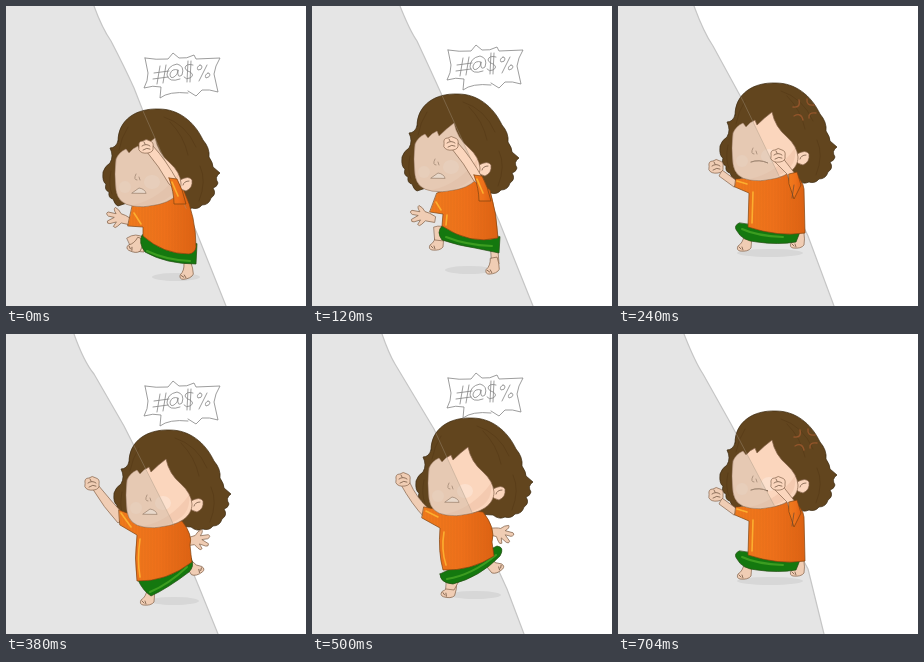
These frames come from a looping animation (300x300 px, 760 ms). An HTML page:

```html
<!DOCTYPE html>
<html lang="en">
<head>
<meta charset="utf-8">
<title>Temper at the glass</title>
<style>
html, body { margin: 0; width: 100%; height: 100%; overflow: hidden; background: #fff; }
svg { display: block; width: 100vw; height: 100vh; }
path { stroke-linejoin: round; stroke-linecap: round; }
.skin { fill: #fbd6bd; stroke: #84644b; stroke-width: .7; }
#body .skin { fill: #f0cdb4; }
.shirt { fill: url(#cloth); stroke: #7d4310; stroke-width: .7; }
.pants { fill: #14780f; stroke: #254d14; stroke-width: .7; }
.hair { fill: #62451e; stroke: #3b2a12; stroke-width: .7; }
.line { fill: none; stroke: #654935; stroke-width: .7; }
.ink { fill: none; stroke: #858585; stroke-width: .8; }
.shine { fill: none; stroke: #ffbd35; stroke-width: 1.6; opacity: .8; }
.grass { fill: none; stroke: #3c9d20; stroke-width: 2; }
</style>
</head>
<body>
<svg viewBox="0 0 300 300">
  <defs>
    <linearGradient id="cloth">
      <stop offset="0" stop-color="#f07a1c"/>
      <stop offset=".55" stop-color="#ee701a"/>
      <stop offset="1" stop-color="#dd6213"/>
    </linearGradient>
    <pattern id="rib" width="3" height="4" patternUnits="userSpaceOnUse">
      <path d="M1 0V4" stroke="#c9600e" stroke-width=".7" opacity=".25"/>
    </pattern>
    <clipPath id="pane"><path id="paneShape"/></clipPath>
    <clipPath id="headClip"><path id="headShape"/></clipPath>
  </defs>
  <path id="wall" fill="#e5e5e5"/>
  <path id="edge" fill="none" stroke="#c6c6c6" stroke-width="1.2"/>
  <ellipse id="shadow" ry="4" fill="#d7d7d7"/>
  <g id="hair">
    <path class="hair" d="M112 135C112 114 130 102 153 103C172 103 188 115 197 134Q204 142 203 151Q207 157 207 161L214 167Q208 171 212 177Q211 181 207 182Q211 188 205 192Q203 199 196 199Q192 204 186 202Q180 205 174 200L121 197L112 200Q109 199 107 193Q102 192 103 186Q98 184 100 178Q96 176 97 166Q99 160 104 157Q108 150 104 142Q110 142 112 135Z"/>
    <path d="M158 111Q180 118 190 141M164 116Q178 130 182 149M122 121Q115 132 113 144M194 160Q201 175 193 195M105 165Q102 180 106 188" fill="none" stroke="#553a17" stroke-width="1" opacity=".6"/>
  </g>
  <g id="body"></g>
  <g id="head">
    <path class="skin" d="M174 174Q183 169 186 174Q187 182 180 185Q174 184 172 180Z"/>
    <path class="line" d="M177 179Q178 175 183 175"/>
    <path id="face" class="skin" d="M110 153Q113 146 120 143L123 147Q127 142 132 140L134 145Q141 138 149 132Q152 147 164 157Q174 166 175 177C175 190 162 197 149 199Q137 202 127 200Q112 198 110 184Q108 168 110 153Z"/>
    <path fill="#f0c4a8" opacity=".6" d="M172 168Q175 190 149 198Q137 201 127 199Q154 193 172 168Z"/>
    <ellipse cx="119" cy="181" rx="6" ry="6" fill="#fff" opacity=".22"/>
    <ellipse cx="146" cy="176" rx="8" ry="7" fill="#fff" opacity=".25"/>
    <path class="line" d="M130 168Q127 174 131 174M133 171L134 174"/>
    <path id="mouth" class="line" style="fill:#fff3ea"/>
  </g>
  <g id="glass">
    <g clip-path="url(#pane)">
      <path id="glare" fill="#d0bba8" opacity=".48"/>
    </g>
    <g clip-path="url(#headClip)">
      <path id="seam" fill="none" stroke="#a39480" stroke-width=".8" opacity=".5"/>
    </g>
  </g>
  <g id="front"></g>
  <g id="bubble">
    <path class="ink" d="M139 52Q150 54 162 53L167 47L173 52Q181 53 188 49L190 53L214 52Q209 60 208 68L212 86Q203 83 196 84L190 90L182 85M182 87Q163 85 154 92L155 81Q147 79 138 82Q142 75 142 67L139 52"/>
    <path class="ink" d="M154 60L151 78M160 59L157 77M148 67L163 65M147 73L162 71M172 64Q166 62 164 68Q164 73 168 71Q172 69 172 64Q171 73 176 69Q179 60 171 58Q161 60 161 69Q163 77 174 73M187 59Q180 57 179 62Q180 65 184 66Q189 69 184 72Q180 74 178 71M182 55L181 76M185 55L184 76M194 59Q190 61 192 64Q196 64 196 61Q196 59 194 59M201 59L193 75M202 67Q198 69 200 72Q204 71 204 69Q204 67 202 67"/>
  </g>
  <path id="anger" fill="none" stroke="#93552b" stroke-width="1.4" d="M-11 -3Q-3 -2 -5 -10M3 -11Q2 -4 10 -5M-10 6Q-3 2 -1 10M5 8Q4 2 12 3"/>
</svg>
<script>
const $ = id => document.getElementById(id);
const part = (kind, d) => `<path class="${kind}" d="${d}"/>`;
const shirt = d => part('shirt', d) + `<path d="${d}" fill="url(#rib)"/>`;

const foot = (x, y, turn, flip = 1) =>
  `<g transform="translate(${x} ${y}) rotate(${turn}) scale(${flip} 1)">` +
  part('skin', 'M-3 -10Q-4 -3 -9 0Q-11 4 -7 5Q1 6 4 2Q5 -4 4 -10Z') +
  part('line', 'M-8 1L-6 3M-5 1L-4 4') + '</g>';

const fist = (x, y) => `<g transform="translate(${x} ${y})">` +
  part('skin', 'M-7 -1Q-8 -6 -3 -6Q0 -9 4 -6Q8 -5 7 0Q8 5 2 6Q-5 7 -7 3Z') +
  part('line', 'M-4 -1Q0 -4 4 -1M-3 3Q1 0 4 2M-2 -5L-1 -3') + '</g>';

const hand = (x, y, turn, flip = 1) =>
  `<g transform="translate(${x} ${y}) rotate(${turn}) scale(${flip} 1)">` +
  part('skin', 'M14 -3Q7 -6 3 -6Q0 -10 -4 -11Q-6 -9 -2 -5L-10 -5Q-13 -3 -9 -1L-3 -1L-9 4Q-9 7 -6 6L0 3L-2 8Q0 10 2 7L5 3L14 3Z') + '</g>';

// Raised arm bent in front of the face
const bentArm = (x, y) => `<g transform="translate(${x} ${y})">` +
  part('skin', 'M3 4Q15 18 25 36L33 42L34 34Q22 12 9 -2Z') +
  part('shirt', 'M25 30L33 31Q39 42 42 56L30 56Q30 44 25 30Z') +
  part('shine', 'M28 34L34 48') + '</g>' + fist(x + 2, y - 1);

const openMouth = 'M126 187L133 182Q139 183 140 187Z';

const crouch = {
  shadow: [152, 247, 33],
  body: part('skin', 'M119 175L104 164L101 170L116 181Z') + fist(98, 161) +
    foot(129, 240, 0) + foot(182, 237, 0) +
    part('pants', 'M121 217Q115 220 119 225Q124 235 139 236Q160 239 178 236L182 226Z') +
    part('grass', 'M124 223Q139 230 165 231') +
    shirt('M118 173Q128 173 138 169L174 166Q185 174 186 183L187 227Q160 231 130 221L131 187Q124 184 117 181Z') +
    part('shine', 'M119 175L129 178M135 186L134 217'),
  head: [5, -26],
  mouth: 'M128 182Q136 179 145 183Q136 179 128 182',
  front: part('skin', 'M156 155L169 168L174 183L178 169L164 151Z') +
    part('shirt', 'M171 168L179 166L183 179L176 193L171 178Z') +
    part('line', 'M174 192L176 179') + fist(160, 150)
};

const poses = [
  {
    ends: 120, edge: 'M88 0Q96 22 105 35Q119 62 128 82L137 105L190 225L220 300',
    shadow: [170, 271, 24],
    body: hand(111, 213, 12) + part('skin', 'M121 232Q130 226 138 232L138 246L127 245Z') +
      foot(131, 242, 20) + foot(183, 267, -12) +
      part('pants', 'M136 229Q132 237 139 246Q160 258 190 258L191 238Z') +
      part('grass', 'M141 245Q160 254 184 255') +
      shirt('M127 197L166 176L178 185Q190 211 190 241Q189 247 183 248Q157 248 137 230L137 221L122 220Z') +
      part('shine', 'M128 207L135 218'),
    head: [0, 0], mouth: openMouth,
    front: bentArm(138, 142)
  },
  {
    ends: 240, edge: 'M88 0Q98 25 105 35Q119 65 128 85L187 215L221 300',
    shadow: [157, 264, 24],
    body: hand(109, 211, 10) + foot(127, 239, 0) +
      part('skin', 'M179 243L186 244L187 258L180 258Z') + foot(183, 262, -10) +
      part('skin', 'M122 221Q130 218 138 224L132 235L123 234Z') +
      part('pants', 'M130 220Q124 226 130 234Q148 240 163 242L187 247L188 231Z') +
      part('grass', 'M134 231Q154 239 180 240') +
      shirt('M125 187L164 174L178 184Q185 208 186 232Q158 239 130 220L131 208L118 206Z') +
      part('shine', 'M124 196L129 204M135 209L134 219'),
    head: [-7, -15], mouth: openMouth,
    front: bentArm(137, 139)
  },
  { ends: 380, edge: 'M76 0Q86 27 95 40L125 95L190 230L216 300', anger: [186, 104], ...crouch },
  {
    ends: 500, edge: 'M68 0Q78 28 88 40L118 92L165 185L195 258L212 300',
    shadow: [168, 267, 25],
    body: part('skin', 'M86 154L92 151Q105 167 120 183L112 189Q98 174 86 154Z') + fist(86, 150) +
      hand(193, 207, -8, -1) + foot(144, 266, 0) + foot(188, 237, -30, -1) +
      part('pants', 'M132 246L185 224Q189 232 183 238Q162 254 145 262Q137 257 132 246Z') +
      part('grass', 'M144 258Q163 250 181 233') +
      shirt('M113 176Q126 181 137 185L176 187Q187 201 184 211Q185 222 186 228Q160 248 131 247Q128 224 131 201L114 191Z') +
      part('shine', 'M115 179L125 193M134 205Q131 226 134 243'),
    head: [11, -7], mouth: openMouth,
    front: ''
  },
  {
    ends: 620, edge: 'M70 0Q77 20 83 30L122 95L195 255L212 300',
    shadow: [163, 261, 26],
    body: part('skin', 'M88 149L97 147Q105 165 118 176L113 184Q100 171 88 149Z') + fist(91, 146) +
      hand(190, 201, 15, -1) + foot(139, 259, 10) + foot(182, 235, -35, -1) +
      part('skin', 'M135 244L147 247L142 256L134 255Z') +
      part('pants', 'M128 240Q147 231 185 212Q193 213 188 222Q168 243 141 250Q128 249 128 240Z') +
      part('grass', 'M135 245Q160 241 184 221') +
      shirt('M112 173Q129 177 139 174L171 178Q184 194 180 208L182 222Q159 237 131 236Q126 218 128 194L110 184Z') +
      part('shine', 'M114 177L126 183M132 198Q129 216 134 231'),
    head: [7, -19], mouth: openMouth,
    front: ''
  },
  { ends: 760, edge: 'M66 0Q77 28 85 40L113 90L190 235L206 300', anger: [187, 106], ...crouch }
];

const faceShape = $('face').getAttribute('d');
const hairShape = $('hair').firstElementChild.getAttribute('d');
$('glare').setAttribute('d', faceShape);
$('headShape').setAttribute('d', hairShape + faceShape);

const move = (id, [x, y]) => $(id).setAttribute('transform', `translate(${x} ${y})`);
const show = (id, on) => $(id).style.display = on ? '' : 'none';
let current;

function draw(time) {
  const t = time % 760;
  const index = poses.findIndex(p => t < p.ends);
  if (index === current) return;
  current = index;
  const pose = poses[index];
  const area = pose.edge + 'L0 300L0 0Z';
  for (const id of ['wall', 'paneShape']) $(id).setAttribute('d', area);
  for (const id of ['edge', 'seam']) $(id).setAttribute('d', pose.edge);
  ['cx', 'cy', 'rx'].forEach((key, i) => $('shadow').setAttribute(key, pose.shadow[i]));
  $('body').innerHTML = pose.body;
  $('front').innerHTML = pose.front;
  $('mouth').setAttribute('d', pose.mouth);
  for (const id of ['hair', 'head', 'glare', 'headShape']) move(id, pose.head);
  show('anger', pose.anger);
  show('bubble', !pose.anger);
  if (pose.anger) move('anger', pose.anger);
  else move('bubble', index % 3 ? [-3, -8] : [0, 0]);
}

const start = performance.now();
function tick() {
  draw(performance.now() - start);
  requestAnimationFrame(tick);
}
tick();
</script>
</body>
</html>
```
